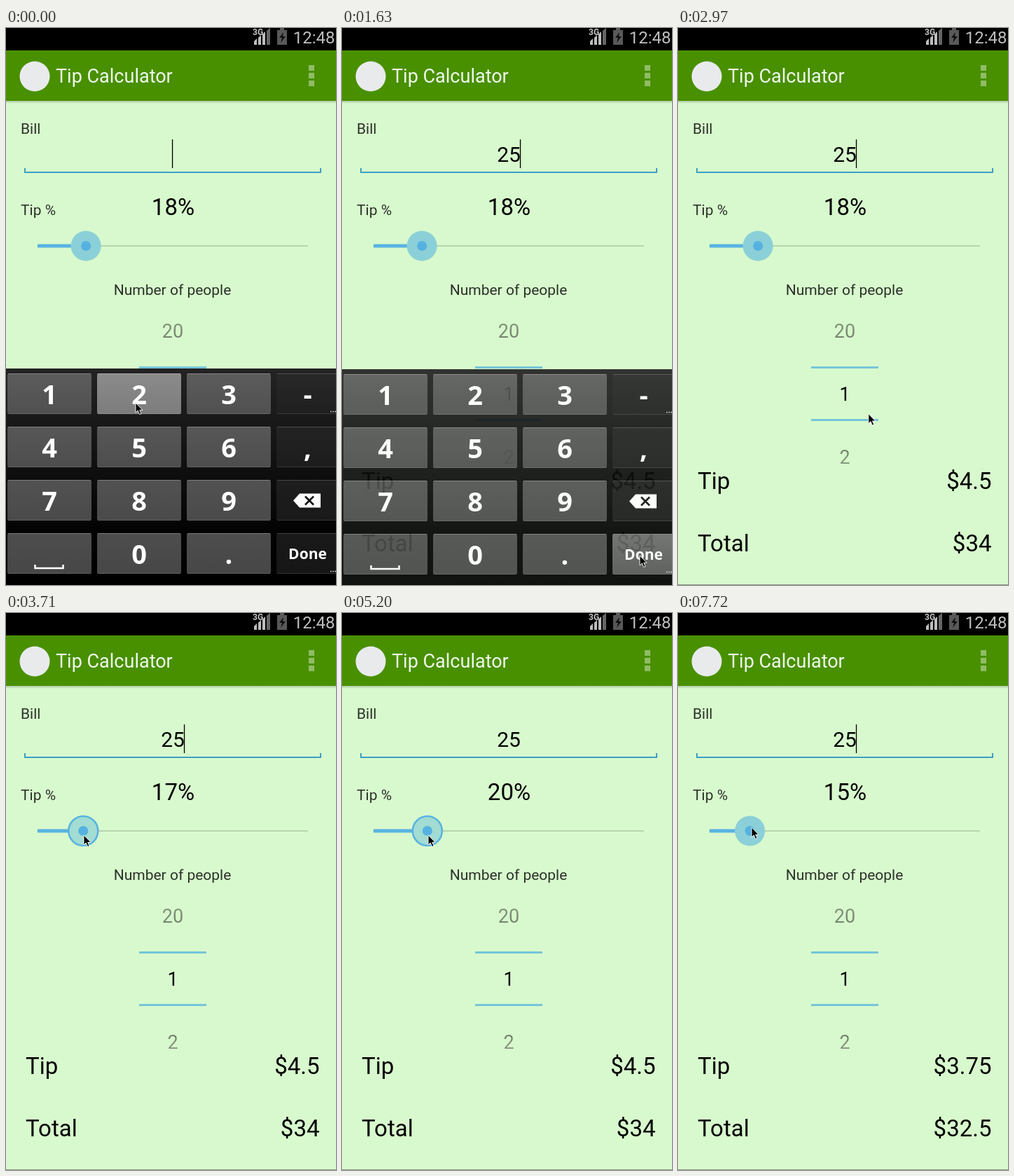
These frames come from a looping animation (471x795 px, 8 s). An HTML page:

```html
<!DOCTYPE html>
<html lang="en">
<head>
<meta charset="utf-8">
<title>Tip Calculator</title>
<style>
html, body { margin: 0; width: 100%; height: 100%; overflow: hidden; background: #d8f9cd; }
svg { display: block; width: 471px; height: 795px; font-family: Roboto, sans-serif; }
.key { font: 700 38px "Open Sans", "Noto Sans", sans-serif; fill: #fff; text-anchor: middle; }
.mid { text-anchor: middle; }
.end { text-anchor: end; }
.label { font-size: 21px; fill: #2b3229; }
.big { font-size: 33px; }
.pick { font-size: 27px; }
</style>
</head>
<body>
<svg viewBox="0 0 471 795">
  <defs>
    <linearGradient id="board" x2="0" y2="1"><stop stop-color="#232323"/><stop offset=".75" stop-color="#030303"/><stop offset="1"/></linearGradient>
    <linearGradient id="shade" x2="0" y2="1"><stop stop-opacity=".2"/><stop offset="1" stop-opacity="0"/></linearGradient>
    <linearGradient id="fadeUp" x2="0" y2="1"><stop stop-color="#879981"/><stop offset="1" stop-color="#6f8069"/></linearGradient>
    <linearGradient id="fadeDown" x2="0" y2="1"><stop stop-color="#6c7d66"/><stop offset="1" stop-color="#93a68c"/></linearGradient>
    <linearGradient id="lit" x2="0" y2="1"><stop stop-color="#8b8b8b"/><stop offset="1" stop-color="#7c7c7c"/></linearGradient>
    <linearGradient id="litDark" x2="0" y2="1"><stop stop-color="#6c6c6c"/><stop offset="1" stop-color="#565656"/></linearGradient>
  </defs>
  <rect width="471" height="795" fill="#d8f9cd"/>
  <rect y="794" width="471" height="1" fill="#8a9a84"/>

  <!-- status bar -->
  <rect width="471" height="32"/>
  <text x="352" y="10" font-size="12" font-weight="700" fill="#c4c4c4">3G</text>
  <path d="M354 24v-5l4-4v9zM360 24V14l4-4v14zM366 24V9l4-4v19z" fill="#bdbdbd"/>
  <path d="M372 24V4l5-4v24z" fill="#666"/>
  <path d="M387 3h4V0h6v3h4v21h-14z" fill="#595959"/>
  <path d="M396 6l-6 8h4l-2 7 7-9h-4z" fill="#111"/>
  <text x="469.5" y="22" class="end" font-size="24" fill="#bebebe">12:48</text>

  <!-- action bar -->
  <rect y="32" width="471" height="72" fill="#489000"/>
  <rect y="104" width="471" height="4" fill="url(#shade)"/>
  <circle cx="41" cy="69" r="21.5" fill="#e9eaec"/>
  <text x="71" y="78" font-size="27" fill="#f1f7ea">Tip Calculator</text>
  <path d="M432 53h8v8h-8zM432 64h8v8h-8zM432 75h8v8h-8z" fill="#91bc66"/>

  <!-- form -->
  <text x="21" y="151" class="label">Bill</text>
  <text id="bill" x="238" y="191" class="mid" font-size="30"></text>
  <rect id="caret" y="159" width="1.3" height="41"/>
  <path d="M27 200v6H449v-6" fill="none" stroke="#3d9fc6" stroke-width="2"/>
  <text x="21" y="267" class="label">Tip %</text>
  <text id="percent" x="238.5" y="267" class="mid big"></text>
  <rect x="45" y="310" width="386" height="2" fill="#b9d3b0"/>
  <rect id="progress" x="45" y="308.5" height="5" fill="#58b3e1"/>
  <g id="thumb">
    <circle id="halo" cy="311"/>
    <circle cy="311" r="7" fill="#55b2e0"/>
  </g>
  <text x="237.5" y="381" class="label mid">Number of people</text>
  <text x="238" y="442" class="mid pick" fill="url(#fadeUp)">20</text>
  <text x="238" y="532" class="mid pick">1</text>
  <text x="238" y="622" class="mid pick" fill="url(#fadeDown)">2</text>
  <path d="M190 484.5h96M190 559.5h96" stroke="#74c6da" stroke-width="3"/>
  <text x="28" y="658" class="big">Tip</text>
  <text id="tip" x="447.5" y="658" class="big end"></text>
  <text x="28" y="747" class="big">Total</text>
  <text id="total" x="447.5" y="747" class="big end"></text>

  <g id="keyboard">
    <rect y="486" width="471" height="309" fill="url(#board)"/>
    <g id="keys"></g>
    <path d="M41.5 766v5h40v-5" fill="none" stroke="#fff" stroke-width="2.5"/>
    <path d="M410 674.500l9-10h30v20h-30z" fill="#fff"/>
    <path d="M427 668.500l12 12m0-12l-12 12" stroke="#111" stroke-width="2.6"/>
    <path d="M463 547.500h8M463 775.500h8" stroke="#ddd" stroke-width="1.6" stroke-dasharray="1.6"/>
  </g>
  <path id="cursor" d="M0 0V14L3.200 11 5.600 16.500 8 15.500 5.700 10.300H10Z" stroke="#fff" stroke-width=".9"/>
</svg>
<script>
const LOOP = 8000, STEP = 148.5;
const $ = id => document.getElementById(id);
const set = (el, attrs) => { for (const k in attrs) el.setAttribute(k, attrs[k]); };
const add = (parent, tag, attrs, text = '') => {
  const el = document.createElementNS('http://www.w3.org/2000/svg', tag);
  set(el, attrs);
  el.textContent = text;
  parent.append(el);
  return el;
};

// Keyboard: three grey columns and a darker one cut by the right edge
const rows = [['1', '2', '3', '-'], ['4', '5', '6', ','], ['7', '8', '9', ''], ['', '0', '.', 'Done']];
const keys = {};
const grey = v => `rgb(${v},${v},${v})`;
rows.forEach((row, r) => {
  ['light', 'dark'].forEach((kind, i) => {
    const g = add(document.querySelector('defs'), 'linearGradient', { id: kind + r, x2: 0, y2: 1 });
    const top = (i ? 40 : 92) - r * 5;
    add(g, 'stop', { 'stop-color': grey(top) });
    add(g, 'stop', { offset: 1, 'stop-color': grey(top - (i ? 9 : 12) + r * 2) });
  });
  row.forEach((name, c) => {
    const x = 2 + c * 128, y = 493 + r * 76, dark = c === 3;
    const fill = `url(#${dark ? 'dark' : 'light'}${r})`;
    const box = add($('keys'), 'rect', { x, y, width: 120, height: 58, rx: 2, fill });
    add($('keys'), 'rect', { x: x + 1, y, width: 118, height: 1, fill: '#fff', opacity: dark ? .18 : .25 });
    add($('keys'), 'rect', { x: x + 1, y: y + 57, width: 118, height: 1, fill: '#fff', opacity: .12 });
    const done = name === 'Done';
    add($('keys'), 'text', {
      x: dark ? 430.5 : x + 60, y: y + (done ? 37 : 44), class: 'key', style: done ? 'font-size:21px' : ''
    }, name);
    keys[name] = { box, fill };
  });
});

// Pointer stops: step, x, y
const stops = [
  [1, 185, 535], [3, 188, 600], [4, 188, 600], [8, 425, 753], [14, 425, 753], [17, 312, 609],
  [19, 312, 609], [24, 111, 317], [28, 111, 317], [35, 123, 317], [42, 123, 317], [43, 120, 306],
  [46, 120, 306], [50, 105, 306]
];
function pointer(n) {
  let i = stops.findIndex(s => s[0] >= n);
  if (i < 0) return stops[stops.length - 1].slice(1);
  if (i === 0) return stops[0].slice(1);
  const a = stops[i - 1], b = stops[i], k = (n - a[0]) / (b[0] - a[0]);
  return [a[1] + (b[1] - a[1]) * k, a[2] + (b[2] - a[2]) * k];
}
const dragged = n => Math.floor((pointer(n)[0] - 43) / 4 + 1e-6);
const percentAt = n => n < 25 ? 18 : dragged(n < 45 ? Math.min(n, 36) : n);

function press(name, on, lit) {
  set(keys[name].box, { fill: on ? `url(#${lit})` : keys[name].fill });
}

function draw(t) {
  const n = Math.floor((t + 8) / STEP);
  const [x, y] = pointer(n);
  set($('cursor'), { transform: `translate(${x} ${y})` });

  press('2', n === 0, 'lit');
  press('5', n === 3, 'lit');
  press('Done', n >= 10, 'litDark');
  set($('keyboard'), {
    visibility: n < 12 ? 'visible' : 'hidden',
    opacity: n < 11 ? 1 : .92,
    transform: `translate(0 ${n < 11 ? 0 : 1})`
  });

  const bill = n < 1 ? '' : n < 4 ? '2' : '25';
  $('bill').textContent = bill;
  const caretOn = n < 8 || (n >= 11 && (n * STEP - 1630 + 10) % 1000 < 500);
  set($('caret'), { x: 236.9 + bill.length * 8.5, visibility: caretOn ? 'visible' : 'hidden' });

  const p = percentAt(n), px = 45 + p * 3.84;
  const held = (n >= 25 && n < 37) || (n >= 45 && n < 52);
  $('percent').textContent = p + '%';
  set($('progress'), { width: px - 45 });
  set($('thumb'), { transform: `translate(${px} 0)` });
  set($('halo'), held
    ? { r: 21, fill: '#a2dcd3', stroke: '#58b3e1', 'stroke-width': 2.6 }
    : { r: 21.5, fill: '#8bd0d8', stroke: 'none' });

  const [tip, total] = n < 37 ? ['4.5', '34'] : n < 52 ? ['5', '35'] : ['3.75', '32.5'];
  $('tip').textContent = '$' + tip;
  $('total').textContent = '$' + total;
}

const start = performance.now();
function tick() {
  draw((performance.now() - start) % LOOP);
  requestAnimationFrame(tick);
}
tick();
</script>
</body>
</html>
```
